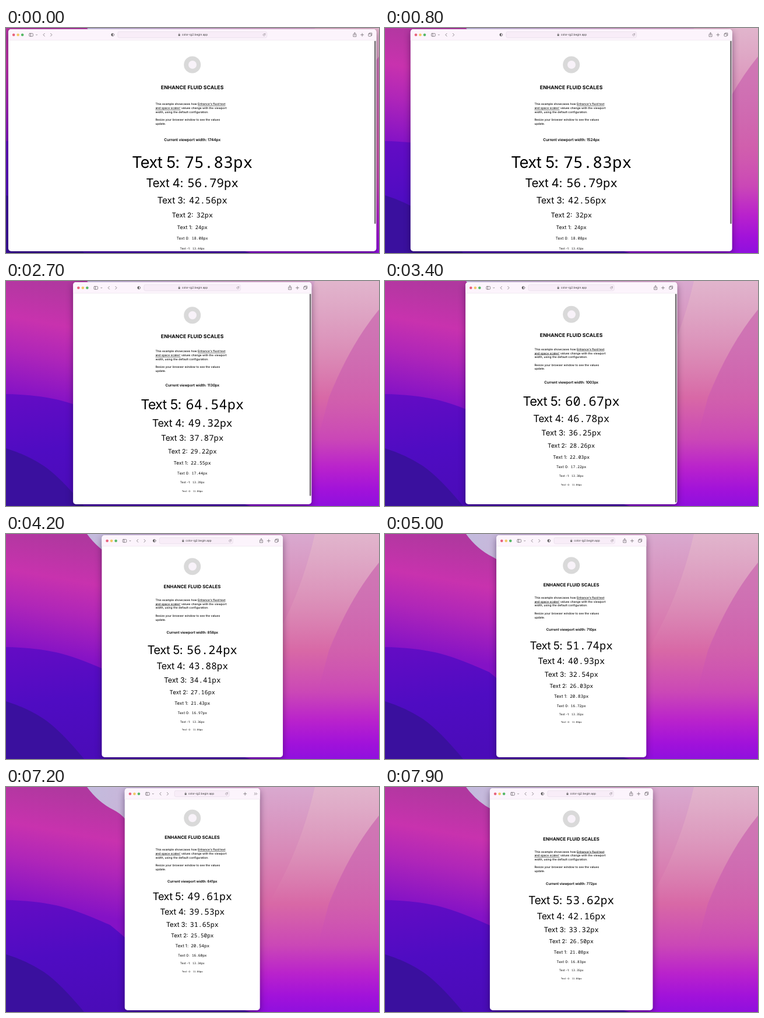
These frames come from a looping animation (640x386 px, 8 s). An HTML page:

```html
<!DOCTYPE html>
<html lang="en">
<head>
<meta charset="utf-8">
<title>Fluid scales</title>
<style>
  html, body { margin: 0; width: 100%; height: 100%; overflow: hidden; }
  svg { display: block; width: 640px; height: 386px; }
  text { font-family: Inter, sans-serif; fill: #000; text-rendering: geometricPrecision; white-space: pre; }
  .mid { text-anchor: middle; }
  .mono { font-family: "Noto Sans Mono", monospace; letter-spacing: .01em; }
  .title { font-weight: 700; letter-spacing: .012em; }
  .para { font-size: 4.85px; font-weight: 500; letter-spacing: .018em; }
  .link { text-decoration: underline; text-decoration-thickness: .4px; }
  .now { font-weight: 600; letter-spacing: -.012em; }
  .url { font-size: 4.8px; fill: #333; }
  .icon { fill: none; stroke: #6c666c; stroke-width: .75; stroke-linecap: round; stroke-linejoin: round; }
  #frame { filter: drop-shadow(0 4px 6px rgba(20, 0, 40, .45)); }
</style>
</head>
<body>
<svg viewBox="0 0 640 386">
  <defs>
    <linearGradient id="sky" x1="0" y1="0" x2="0" y2="1">
      <stop offset="0" stop-color="#d9a9cf"/><stop offset=".28" stop-color="#d88ab8"/>
      <stop offset=".52" stop-color="#d868a6"/><stop offset=".7" stop-color="#cb48b6"/>
      <stop offset=".83" stop-color="#b922cc"/><stop offset=".93" stop-color="#a112da"/>
      <stop offset="1" stop-color="#9010de"/>
    </linearGradient>
    <linearGradient id="haze" x1="0" y1="0" x2="1" y2="0">
      <stop offset="0" stop-color="#c2bcde"/><stop offset="1" stop-color="#c2bcde" stop-opacity="0"/>
    </linearGradient>
    <linearGradient id="rose" gradientUnits="userSpaceOnUse" x1="70" y1="0" x2="35" y2="200">
      <stop offset="0" stop-color="#b0389f"/><stop offset=".35" stop-color="#c832ae"/>
      <stop offset=".62" stop-color="#b026b8"/><stop offset="1" stop-color="#8412c6"/>
    </linearGradient>
    <linearGradient id="blue" x1="0" y1="0" x2=".3" y2="1">
      <stop offset="0" stop-color="#640cc4"/><stop offset=".5" stop-color="#4f0cc2"/><stop offset="1" stop-color="#4a0cb8"/>
    </linearGradient>
    <linearGradient id="wedge" x1="0" y1="0" x2="0" y2="1">
      <stop offset="0" stop-color="#e2b6cc" stop-opacity=".9"/><stop offset="1" stop-color="#e08cb0" stop-opacity="0"/>
    </linearGradient>
    <linearGradient id="slope" x1="0" y1="0" x2="0" y2="1">
      <stop offset="0" stop-color="#cf78b4"/><stop offset=".5" stop-color="#cc60b0" stop-opacity=".7"/>
      <stop offset="1" stop-color="#c440bc" stop-opacity="0"/>
    </linearGradient>
    <clipPath id="clip"><rect id="clipBox" y="2" height="381" rx="5"/></clipPath>
  </defs>

  <rect width="640" height="386" fill="url(#sky)"/>
  <path fill="url(#wedge)" d="M530 0H640V49Q590 110 556 200H450Q505 110 530 0Z"/>
  <path fill="url(#slope)" d="M640 49Q590 110 554 200L530 290H640Z"/>
  <rect x="130" width="290" height="120" fill="url(#haze)"/>
  <path fill="url(#rose)" d="M0 0H139Q158 26 184 39T215 78L250 140V290H0Z"/>
  <path fill="url(#blue)" d="M0 194Q50 195 86 203T179 237Q215 266 260 310T420 386H0Z"/>
  <path fill="#3a109e" d="M0 287Q35 298 63 316T134 386H0Z"/>

  <rect id="frame" y="2" height="381" rx="5" fill="#fff"/>
  <g clip-path="url(#clip)">
    <rect y="2" width="640" height="19" fill="#fcf4fc"/>
    <rect y="20.7" width="640" height=".5" fill="#e6dde6"/>
    <g id="left">
      <circle cx="9.2" cy="11.8" r="2.3" fill="#e8627c"/>
      <circle cx="16.7" cy="11.8" r="2.3" fill="#f2c765"/>
      <circle cx="24.2" cy="11.8" r="2.3" fill="#55b866"/>
      <g class="icon">
        <rect x="35.8" y="9.3" width="6.6" height="5" rx="1"/>
        <path d="M38.2 9.3v5M47.6 11.3l1 1 1-1M62.3 9.3l-2.3 2.4 2.3 2.4M72.6 9.3l2.3 2.4-2.3 2.4"/>
      </g>
    </g>
    <rect id="field" y="6.3" height="10.4" rx="2.4" fill="#f8edf8" stroke="#e3d8e4" stroke-width=".6"/>
    <g id="shield">
      <circle cy="11.6" r="2.4" class="icon"/><path d="M0 9.2a2.4 2.4 0 0 0 0 4.8z" fill="#555"/>
    </g>
    <g id="address">
      <rect x="-24" y="11" width="3" height="2.6" rx=".4" fill="#666"/>
      <path class="icon" d="M-23.4 11v-.8a.9.9 0 0 1 1.8 0v.8" style="stroke-width:.5"/>
      <text class="url" x="-18" y="13.4">color-ig2.begin.app</text>
    </g>
    <path id="reload" class="icon" style="stroke-width:.5" d="M1.5 10.7a1.8 1.8 0 1 0 .3 1.2M1.8 9.3v1.5h-1.4"/>
    <g id="wide" class="icon">
      <path d="M-38.4 10.6h-1.2v4.2h5v-4.2h-1.2M-37.1 12.6v-4.6M-38.4 9.2l1.3-1.3 1.3 1.3M-24.3 9.2v5M-26.8 11.7h5"/>
      <path d="M-12.2 9.9v-1.2h4.5v4.2h-1.2"/><rect x="-13.6" y="10" width="4.6" height="4.2" rx=".7"/>
    </g>
    <g id="narrow" class="icon">
      <path d="M-25.5 9.2v5M-28 11.7h5M-9.4 10l1.7 1.7-1.7 1.7M-6.7 10l1.7 1.7-1.7 1.7"/>
    </g>
    <g id="logo">
      <circle cx="319.7" r="14.5" fill="#d9d9d9"/><circle cx="320" r="7" fill="#f8f2f9"/>
    </g>
    <text id="title" class="title mid" x="319.6">ENHANCE FLUID SCALES</text>
    <g id="para">
      <text class="para" x="256.4" y="1.7">This example showcases how <tspan class="link">Enhance's fluid text</tspan></text>
      <text class="para" x="256.4" y="8.5"><tspan class="link">and space scales'</tspan> values change with the viewport</text>
      <text class="para" x="256.4" y="15.3">width, using the default configuration.</text>
      <text class="para" x="256.4" y="28.6">Resize your browser window to see the values</text>
      <text class="para" x="256.4" y="35.4">update.</text>
    </g>
    <text id="now" class="now mid" x="319.7"></text>
    <g id="scale"></g>
    <rect id="thumb" y="22" width="2.4" rx="1.2" fill="#6e6a6e"/>
  </g>
</svg>
<script>
const $ = id => document.getElementById(id);
const set = (el, attrs) => { for (const k in attrs) el.setAttribute(k, attrs[k]); };
const show = (el, on) => { el.style.display = on ? '' : 'none'; };
const shift = (el, x, y = 0) => el.setAttribute('transform', `translate(${x} ${y})`);

const ZOOM = 0.3621, MID = 319.7, LOOP = 8000;

// [time, viewport width]
const drag = [[0, 1744], [800, 1524], [1800, 1292], [2700, 1130], [4200, 858], [4500, 806],
  [5400, 634], [5700, 579], [5900, 579], [6000, 574], [6800, 574], [7000, 594], [7300, 664], [7700, 752], [7900, 772]];

// step, vw slope, base px, max px, y when wide, rise when narrow
const steps = [
  [5, 3.05, 30.073, 75.83, 230, 45.3], [4, 2, 26.72, 56.79, 265.7, 56.4],
  [3, 1.27, 23.515, 42.56, 295, 64.2], [2, .76, 20.635, 32, 320.6, 70.8],
  [1, .41, 17.915, 24, 342.2, 75], [0, .17, 15.515, 18.08, 361, 78.2],
  [-1, .01, 13.275, 13.44, 378.2, 81.4], [-2, 0, 11.04, 11.04, 394, 83.7]
];

const NS = 'http://www.w3.org/2000/svg';
const rows = steps.map(([n]) => {
  const row = document.createElementNS(NS, 'text');
  row.setAttribute('class', 'mid');
  const label = row.appendChild(document.createElementNS(NS, 'tspan'));
  label.textContent = `Text ${n}: `;
  label.style.letterSpacing = `${(2 - n) * .01}em`; // small sizes are set looser
  const code = row.appendChild(document.createElementNS(NS, 'tspan'));
  set(code, { class: 'mono', dx: 2 });
  $('scale').appendChild(row);
  return { row, code };
});

function viewport(t) {
  let i = 1;
  while (i < drag.length - 1 && drag[i][0] < t) i++;
  const [t0, a] = drag[i - 1], [t1, b] = drag[i];
  return a + (b - a) * (t - t0) / (t1 - t0);
}

function drawBrowser(w, q) {
  const width = w * ZOOM, left = MID - width / 2, right = MID + width / 2;
  const wide = width > 245;
  for (const id of ['frame', 'clipBox']) set($(id), { x: left, width });
  shift($('left'), left);
  shift($('wide'), right);
  shift($('narrow'), right);
  show($('wide'), wide);
  show($('narrow'), !wide);
  show($('shield'), wide);

  const field = Math.max(89, width * .405);
  const x = Math.max(MID - field / 2, left + (wide ? 99 : 85.5));
  set($('field'), { x, width: field });
  shift($('shield'), x - 8.7);
  shift($('address'), x + field / 2 - (wide ? 0 : 5.5));
  shift($('reload'), x + field - 4.7);

  const bottom = 336 + 82 * q;
  show($('thumb'), bottom < 381);
  set($('thumb'), { x: right - 3.4, height: bottom - 22 });
}

function drawPage(w, q) {
  shift($('logo'), 0, 63 - 10.5 * q);
  set($('title'), { y: 105.4 - 17.6 * q, 'font-size': q < .55 ? 8.6 : 8.6 - 1.1 * q });
  shift($('para'), 0, 130.5 - 25 * q);
  set($('now'), { y: 193.8 - 32.6 * q, 'font-size': (18.08 - 1.59 * q) * ZOOM });
  $('now').textContent = `Current viewport width: ${Math.round(w)}px`;

  steps.forEach(([, slope, base, max, y, rise], i) => {
    const px = base + slope * w / 100, size = Math.min(px, max);
    const { row, code } = rows[i];
    const fs = size * ZOOM;
    set(row, { x: MID, y: y - rise * q + fs * .36, 'font-size': fs });
    code.textContent = (px < max ? px.toFixed(2) : max) + 'px';
  });
}

function draw() {
  const t = Math.floor(performance.now() % LOOP / 100) * 100;
  const w = viewport(t), q = (1500 - Math.min(w, 1500)) / 926;
  drawBrowser(w, q);
  drawPage(w, q);
  requestAnimationFrame(draw);
}
draw();
</script>
</body>
</html>
```
